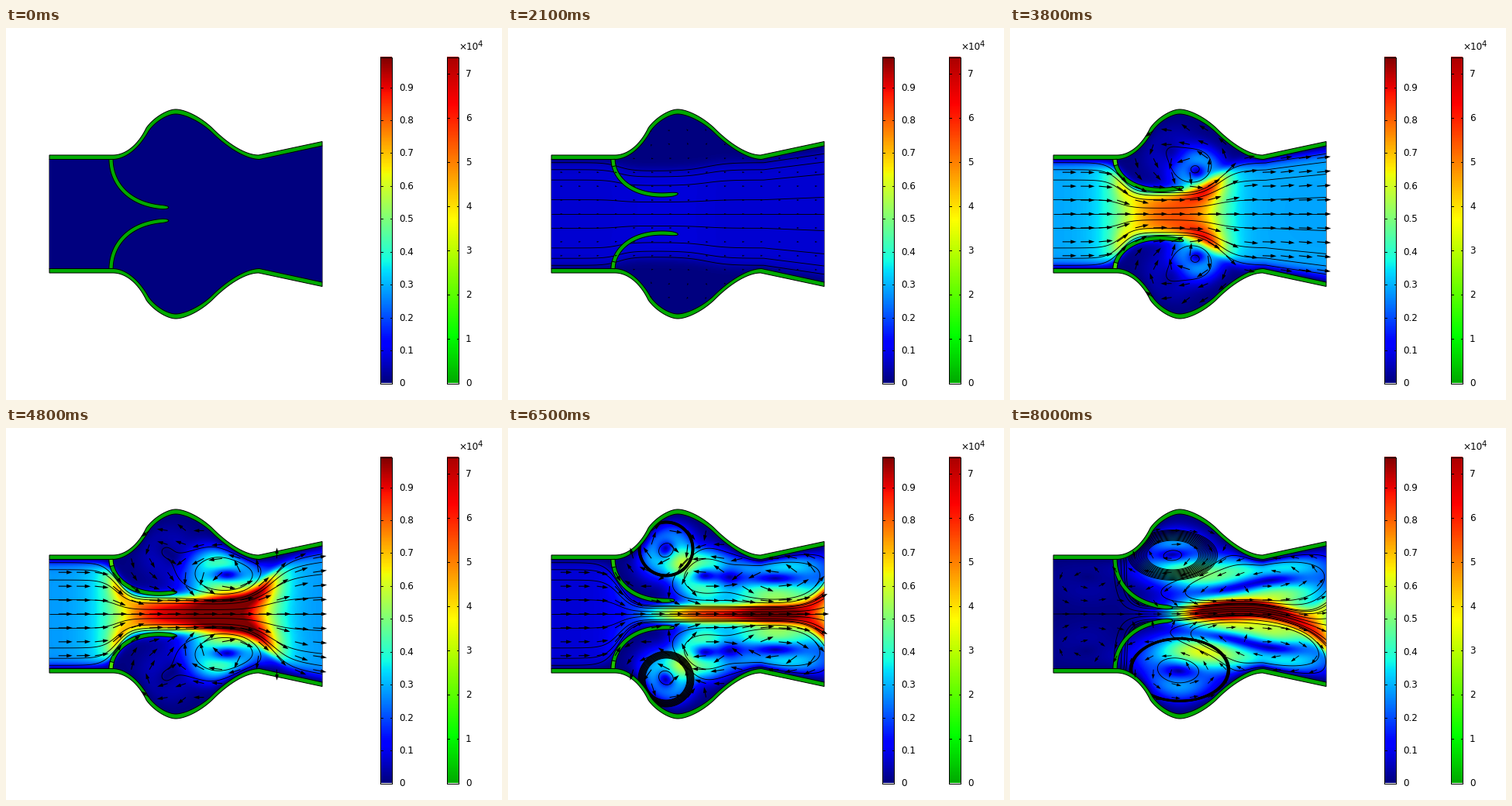
Write a matplotlib script that moves like this. It is 640 px wide and 480 px high and loops after 8100 ms.

```python
import numpy as np
import matplotlib.pyplot as plt
from matplotlib.animation import FuncAnimation
from matplotlib.colors import LinearSegmentedColormap
from matplotlib.patches import Polygon, Rectangle

FRAMES, STEP = 81, 100
MID = 240
GREEN = np.array([0, 0.667, 0])
LIME = np.array([0.3, 0.9, 0])
PX = 0.72  # points per pixel

fig = plt.figure(figsize=(6.4, 4.8), dpi=100, facecolor="white")
ax = fig.add_axes([0, 0, 1, 1])
ax.axis("off")


def ease(t, start, end):
    u = np.clip((t - start) / (end - start), 0, 1)
    return u * u * (3 - 2 * u)


def sigmoid(x):
    return 1 / (1 + np.exp(-np.clip(x, -50, 50)))


def bezier(p0, p1, p2, p3, s):
    s = s[:, None]
    p0, p1, p2, p3 = map(np.asarray, (p0, p1, p2, p3))
    return (1 - s)**3 * p0 + 3 * s * (1 - s)**2 * p1 + 3 * s**2 * (1 - s) * p2 + s**3 * p3


def keep(points):
    return points


def mirror(points):
    return points * [1, -1] + [0, 2 * MID]


def wall_curve(start, *knots, end):
    """Inlet line, a chain of cubic pieces, and a straight outlet."""
    s = np.linspace(0, 1, 30)
    pieces, here = [np.array([start])], knots[0]
    for i in range(1, len(knots), 3):
        pieces.append(bezier(here, *knots[i:i + 3], s))
        here = knots[i + 2]
    return np.vstack(pieces + [np.array([end])])


outer = wall_curve((56, 164), (138, 164), (155, 164), (171, 150), (181, 129),
                   (190, 116), (208, 105), (219, 105), (231, 105), (252, 115), (268, 131),
                   (285, 148), (308, 164), (326, 164), end=(408, 146.5))
inner = wall_curve((56, 169.5), (138, 169.5), (156, 169), (173, 153), (184, 133),
                   (193, 120), (209, 111), (219, 111), (230, 111), (250, 120), (265, 134),
                   (282, 151), (307, 169), (327, 169.5), end=(408, 152))

fluid = Polygon(np.vstack([inner, mirror(inner)[::-1]]), fc="#000080", ec="black", lw=PX, zorder=1)
ax.add_patch(fluid)
for place in (keep, mirror):
    ax.add_patch(Polygon(place(np.vstack([outer, inner[::-1]])), fc=GREEN, ec="black", lw=PX, zorder=5))

# Sample grid; D is the height above the centre line, H that of the wall.
xs, ys = np.arange(56, 409, 2.0), np.arange(104, 377, 2.0)
X, Y = np.meshgrid(xs, ys)
D = MID - Y
H = MID - np.interp(xs, inner[:, 0], inner[:, 1])
wall_fade = np.clip(1 - (np.abs(D) / H)**6, 0, 1)
wall_layer = np.tanh(np.clip(H - np.abs(D), 0, None) / 3)


def main_stream(t):
    """Velocity and normalised stream function of the jet between the leaflets."""
    late = ease(t, 6.5, 8)
    inlet = 0.29 * ease(t, 1.2, 4) * (1 - ease(t, 4.3, 7.6))
    peak = 0.95 * ease(t, 1.6, 4.4) - 0.33 * ease(t, 5, 8)
    opening = 1 - ease(t, 1.2, 2.8)
    gap = 10 + 21 * (1 - ease(t, 2.8, 7)) + 64 * opening
    front = 232 + 185 * ease(t, 2.8, 6.5) + 60 * opening
    mouth = 150 + 70 * ease(t, 4.6, 8)

    ahead = sigmoid((front - xs) / 14)
    centre_speed = inlet + (peak - inlet) * sigmoid((xs - mouth) / 17) * ahead
    wide = 68 + 0.15 * np.clip(xs - 330, 0, None)
    width = wide + (gap - wide) * sigmoid((xs - 143) / 9) * ahead
    run = np.clip((xs - 200) / 100, 0, None)
    bend = late * 8 * run * np.sin(np.pi * run / 1.5)

    ratio = (D - bend) / width
    edge = np.minimum(4, 0.28 * width)
    u = centre_speed * sigmoid((1 - np.abs(ratio)) * width / edge)
    v = u * (ratio * np.gradient(width, xs) + np.gradient(bend, xs))
    still = 1 - 0.95 * late * sigmoid((140 - xs) / 6)
    return u, v, still * ratio / (1 + ratio**4)**0.25


def sinus_ellipse(t, side):
    """Centre and radii of the swirl in the bulge; the lower one grows larger."""
    late = ease(t, 6.5, 8)
    if side > 0:
        return 204 + 6 * late, 84 - 8 * late, 20 + 12 * late, 20 - 2 * late
    return 204 + 15 * late, 84 - 12 * late, 20 + 16 * late, 20 + 3 * late


def swirls(t, side):
    """Centre, radii and rim speed of each swirl in one half."""
    late, travel = ease(t, 6.5, 8), ease(t, 3.2, 6.5)
    yield (232 + 113 * travel, 55 - 9 * travel, 16 + 29 * travel, 15 + 6 * np.sqrt(travel),
           0.5 * ease(t, 2.6, 4.8))
    yield 250 + 20 * late, 50 - 22 * late, 22 + 18 * late, 18, 0.38 * ease(t, 4.6, 6.2)
    yield *sinus_ellipse(t, side), 0.05 * ease(t, 2, 3.5) - 0.38 * ease(t, 4.8, 6.3)
    yield 100, 48, 27, 18, 0.03 * late


def radius2(x0, d0, rx, rd, side):
    return ((X - x0) / rx)**2 + ((side * D - d0) / rd)**2


def flow(t):
    """Velocity, speed map and stream function."""
    u, v, psi = main_stream(t)
    for side in (1, -1):
        for x0, d0, rx, rd, rim in swirls(t, side):
            p = rim * rd * np.exp((1 - radius2(x0, d0, rx, rd, side)) / 2) * wall_fade
            u = u - p * (side * D - d0) / rd**2
            v = v + side * p * (X - x0) / rx**2
            psi = psi + side * p / 50
    return u, v, np.hypot(u, v) * wall_layer, psi


def draw_lines(field, levels):
    lines = ax.contour(X, Y, field, levels, colors="black", linestyles="solid",
                       linewidths=0.9 * PX, zorder=3)
    lines.set_clip_path(fluid)
    moving.append(lines)


def draw_streamlines(t, psi):
    half = [0.27, 0.62, 0.76, 0.83] + ([1.03, 1.12] if t > 1.9 else [])
    draw_lines(psi, sorted([0] + half + [-level for level in half]))
    count = round(14 * ease(t, 5.2, 6.5))
    if count:
        late = ease(t, 6.5, 8)
        for side, band in ((1, 0.15 + 0.6 * late), (-1, 0.45 - 0.35 * late)):
            radius = np.sqrt(radius2(*sinus_ellipse(t, side), side))
            draw_lines(radius, np.linspace(1.8 - band, 1.8, count))


def leaf_shape(t):
    """Whole leaflet and its strained root."""
    lift = ease(t, 1.2, 2.8) * (1 - np.clip((t - 3.2) / 4.8, 0, 1))
    s = np.concatenate([np.linspace(0, 0.92, 50), np.linspace(0.925, 1, 14)])
    line = bezier((135.5, 169.5), (136, 204 - 14 * lift), (163 + 2 * lift, 231 - 14 * lift),
                  (210 + 16 * lift, 231.5 - 30 * lift), s)
    tangent = np.gradient(line, axis=0)
    tangent /= np.hypot(*tangent.T)[:, None]
    half = 2.6 * np.sqrt(np.clip(1 - (np.clip(s - 0.93, 0, None) / 0.07)**2, 0, 1))
    across = np.column_stack([-tangent[:, 1], tangent[:, 0]]) * half[:, None]

    def outline(n):
        return np.vstack([(line + across)[:n], (line - across)[:n][::-1]])
    return outline(len(s)), outline(7)


def color_bar(x, cmap, top, step, labels):
    ax.imshow(np.linspace(1, 0, 421)[:, None], cmap=cmap, extent=(x, x + 15, 458.5, 37.5),
              aspect="auto", interpolation="bilinear")
    ax.add_patch(Rectangle((x, 37.5), 15, 421, fill=False, ec="black", lw=PX, zorder=3))
    for i, label in enumerate(labels):
        y = 458.5 - i * step * 421 / top
        for a in (x, x + 12.5):
            ax.plot([a, a + 2.5], [y, y], color="black", lw=PX, zorder=4)
        ax.text(x + 24, y + 4, label, size=12 * PX, family="DejaVu Sans")


traffic = LinearSegmentedColormap.from_list("traffic", [
    (0, (0, .667, 0)), (.143, (0, 1, 0)), (.5, (1, 1, 0)), (.857, (1, 0, 0)), (1, (.667, 0, 0))])
color_bar(483, "jet", 0.992, 0.1, ["0"] + [f"0.{i}" for i in range(1, 10)])
color_bar(569, traffic, 7.385, 1, [str(i) for i in range(8)])
ax.text(584, 28.5, "×10", size=12 * PX, family="DejaVu Sans")
ax.text(609, 23.5, "4", size=10 * PX, family="DejaVu Sans")

image = ax.imshow(np.zeros_like(D), cmap="jet", vmin=0, vmax=0.992, extent=(55, 409, 377, 103),
                  aspect="auto", interpolation="bicubic", zorder=2)
image.set_clip_path(fluid)
ax.set(xlim=(0, 640), ylim=(480, 0))
ax.set_autoscale_on(False)

leaves = []
for place in (keep, mirror):
    body = ax.add_patch(Polygon([(0, 0)] * 3, fc=GREEN, ec="black", lw=PX, zorder=6))
    root = ax.add_patch(Polygon([(0, 0)] * 3, fc=GREEN, ec="black", lw=PX, zorder=7))
    leaves.append((place, body, root))

# Arrow tails sit in the cells of a 15 by 15 raster.
tail_x, tail_y = np.meshgrid(56 + 352 / 15 * (np.arange(15) + 0.5), MID + 269 / 15 * np.arange(-7, 8))
col, row = ((tail_x - 56) / 2).round().astype(int), ((tail_y - 104) / 2).round().astype(int)
inside = np.abs(tail_y - MID) < H[col] - 1
tail_x, tail_y, col, row = (a[inside] for a in (tail_x, tail_y, col, row))
moving = []


def draw_arrows(t, u, v, speed):
    length = 18 * ease(t, 1.4, 3.8) - 5 * ease(t, 6.5, 8)
    if length < 1:
        return
    u, v, speed = (a[row, col] for a in (u, v, speed))
    size = length * (0.75 + 0.25 * np.clip(speed / 0.25, 0, 1)) / (np.hypot(u, v) + 1e-12)
    moving.append(ax.quiver(
        tail_x, tail_y, u * size, -v * size, angles="xy", scale_units="xy", scale=1,
        units="xy", width=0.35 + 0.04 * length, headwidth=4.5, headlength=7,
        headaxislength=7, color="black", zorder=8))


def update(frame):
    t = frame * STEP / 1000
    while moving:
        moving.pop().remove()
    u, v, speed, psi = flow(t)
    image.set_data(speed)
    if frame:
        draw_streamlines(t, psi)
    draw_arrows(t, u, v, speed)

    body_shape, root_shape = leaf_shape(t)
    strain = ease(t, 1.2, 4.5) * (1 - ease(t, 4.8, 7.8))
    for place, body, root in leaves:
        body.set_xy(place(body_shape))
        root.set_xy(place(root_shape))
        root.set_facecolor(GREEN + (LIME - GREEN) * strain)
        root.set_visible(strain > 0)
    return []


anim = FuncAnimation(fig, update, frames=FRAMES, interval=STEP, repeat=True, repeat_delay=0,
                     init_func=lambda: [], blit=False)
plt.show()
```
